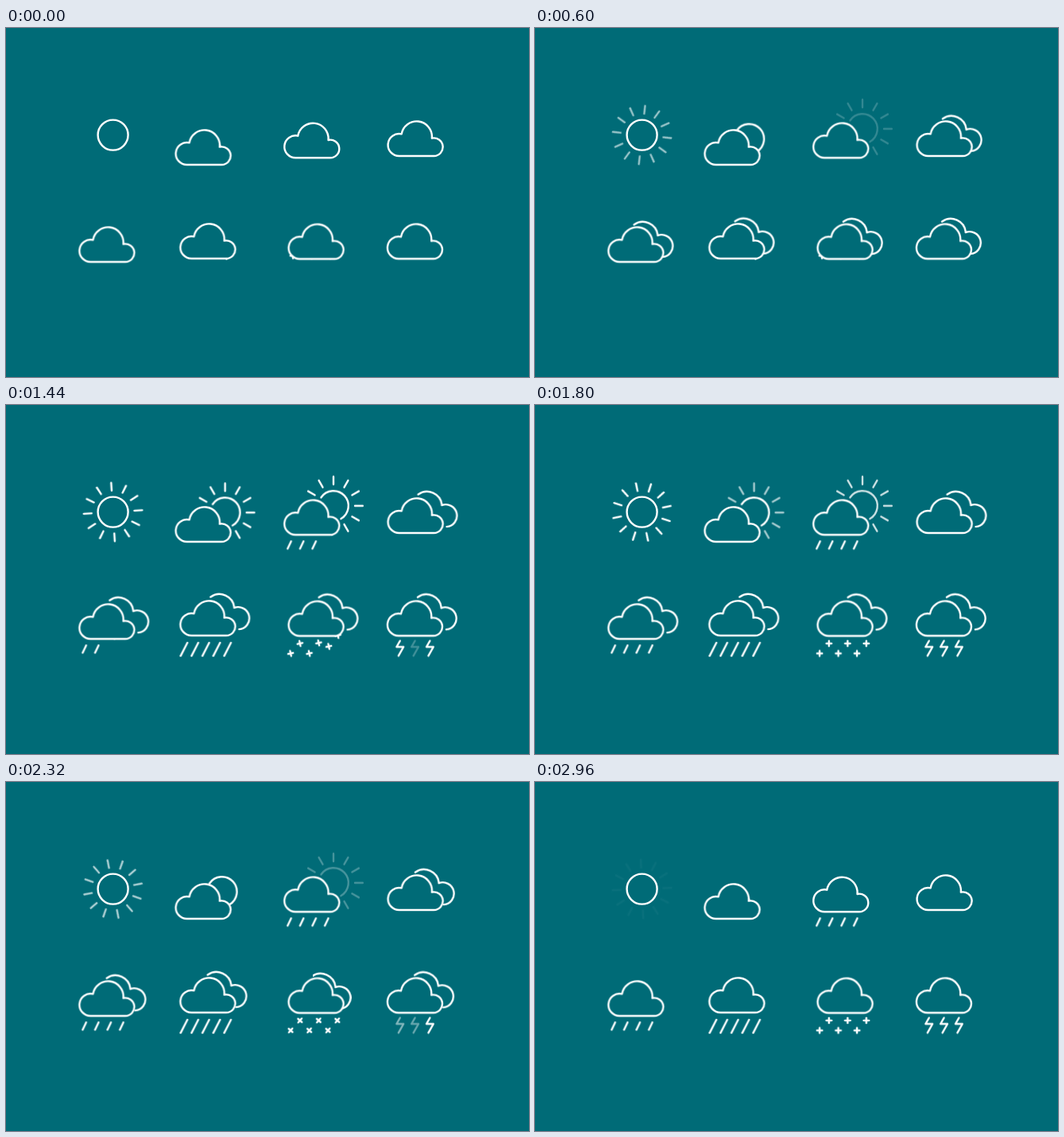
An HTML page for the animation above (3 s loop, 658 by 439 pixels).

```html
<!DOCTYPE html>
<html lang="en">
<head>
<meta charset="utf-8">
<title>Weather icons</title>
<style>
  html, body { margin: 0; width: 100%; height: 100%; overflow: hidden; background: #006b77; }
  svg { display: block; width: 658px; height: 439px; }
  g, path { fill: none; stroke: #fff; stroke-width: 2.4; stroke-linecap: round; stroke-linejoin: round; }
  .front { fill: #006b77; }
  .spin { animation: spin 3s linear infinite; }
  .fade { animation: fade 3s linear infinite; }
  @keyframes spin { to { transform: rotate(180deg); } }
  @keyframes fade {
    0%, 100% { opacity: 0; }
    33.333%, 66.667% { opacity: 1; }
  }
</style>
</head>
<body>
<svg id="stage" viewBox="0 0 658 439">
  <clipPath id="behind"><rect x="30.5" y="-70" width="80" height="90"/></clipPath>
</svg>
<script>
const LOOP = 3000;
const IN_OUT = 'cubic-bezier(.65,0,.35,1)';
const SINE = 'cubic-bezier(.37,0,.63,1)';
const OUT = 'cubic-bezier(.33,.67,.67,1)';

function add(parent, tag, attrs = {}) {
  const el = document.createElementNS('http://www.w3.org/2000/svg', tag);
  for (const key in attrs) el.setAttribute(key, attrs[key]);
  return parent.appendChild(el);
}

const group = (parent, x = 0, y = 0) => add(parent, 'g', { transform: `translate(${x} ${y})` });
const draw = (parent, d) => add(parent, 'path', { d });

// Each frame is [time in ms, value, easing to the next frame].
function animate(el, prop, frames) {
  const keys = frames.map(([ms, value, easing = 'linear']) => ({ offset: ms / LOOP, [prop]: value, easing }));
  keys.unshift({ ...keys[0], offset: 0, easing: 'linear' });
  keys.push({ ...keys[keys.length - 1], offset: 1 });
  el.animate(keys, { duration: LOOP, iterations: Infinity });
}

const move = (x, y) => `translate(${x}px, ${y}px)`;

function polar(cx, cy, r, deg) {
  const a = deg * Math.PI / 180;
  return `${(cx + r * Math.cos(a)).toFixed(2)} ${(cy + r * Math.sin(a)).toFixed(2)}`;
}

// Chain of clockwise arcs, each [cx, cy, r, from, to] in degrees.
function arcs(...list) {
  return list.map(([cx, cy, r, from, to], i) =>
    `${i ? 'L' : 'M'}${polar(cx, cy, r, from)} A${r} ${r} 0 ${to - from > 180 ? 1 : 0} 1 ${polar(cx, cy, r, to)}`
  ).join(' ');
}

function rays(parent, first, count) {
  let d = '';
  for (let i = 0; i < count; i++) {
    const a = first + i * 30;
    d += `M${polar(0, 0, 27, a)} L${polar(0, 0, 36.8, a)} `;
  }
  return draw(parent, d);
}

const CLOUD = arcs([14, -14, 14, 90, 282], [36, -24.3, 19.3, 190, 364], [57.7, -11.3, 11.3, 257.5, 450]) + 'Z';
const BACK_CLOUD = arcs([49, -33, 19, 234.6, 354], [72.7, -21.8, 14, 249, 445]);
const SUN_ARC = arcs([0, 0, 18.8, 214, 420]);
const FLAKE = 'M-3.2 0H3.2M0 -3.2V3.2';

function fall(el, start, length, dx, dy, easing = IN_OUT) {
  animate(el, 'transform', [[start, move(dx, dy), easing], [start + length, move(0, 0)]]);
}

// Origin is the lower left corner of the front cloud.
function cloud(x, y, fill) {
  const icon = group(stage, x, y);
  fill(icon);
  add(icon, 'path', { d: CLOUD, class: 'front' });
}

function backCloud(icon, leave = 2000) {
  const clip = add(icon, 'g', { 'clip-path': 'url(#behind)' });
  const back = draw(clip, BACK_CLOUD);
  const hidden = move(-28, 8);
  animate(back, 'transform', [
    [0, hidden, IN_OUT], [960, move(0, 0)], [leave, move(0, 0), IN_OUT], [leave + 1000, hidden]
  ]);
  animate(back, 'visibility', [
    [0, 'hidden', 'step-end'], [120, 'visible', 'step-end'], [leave + 900, 'hidden', 'step-end']
  ]);
}

function lightRain(icon, start) {
  for (let i = 0; i < 4; i++) {
    const x = 15.6 * i;
    fall(draw(icon, `M${x + 8.4} 8.2L${x + 4} 17.4`), start + 200 * i, 300, 12, -24);
  }
}

function heavyRain(icon) {
  for (let i = 0; i < 5; i++) {
    const x = 13.7 * i;
    fall(draw(icon, `M${x + 8.8} 9L${x + 0.3} 25.6`), 740 + 130 * i, 180, i < 4 ? 12.5 : 3, i < 4 ? -26 : -25);
  }
}

function snow(icon) {
  // Columns and rows in the order of falling.
  const order = [[0, 1], [2, 1], [1, 0], [3, 0], [4, 1], [5, 0]];
  order.forEach(([col, row], i) => {
    const spot = group(icon, 2.5 + 11.75 * col, row ? 22 : 9.5);
    const flake = add(spot, 'g');
    fall(flake, 800 + 100 * i, 400, row ? 3 : 1, row ? -26 : -14, SINE);
    animate(draw(flake, FLAKE), 'transform', [
      [1000, 'rotate(-90deg)', OUT], [1700, 'rotate(0deg)'],
      [1800, 'rotate(0deg)', SINE], [2900, 'rotate(90deg)']
    ]);
  });
}

function lightning(icon) {
  const dips = [
    [[1060, .7], [2320, .5]],
    [[1440, .25], [2320, .4]],
    [[2720, .4]]
  ];
  dips.forEach((list, i) => {
    const x = 18.8 * i;
    const bolt = draw(icon, `M${x + 15.8} 6.4L${x + 11.4} 14H${x + 20.2}L${x + 13.9} 25.2`);
    fall(bolt, [720, 930, 1100][i], 300, 11 - 3 * i, -28);
    animate(bolt, 'opacity', list.flatMap(([ms, low]) => [[ms - 120, 1], [ms, low], [ms + 120, 1]]));
  });
}

const stage = document.getElementById('stage');

// Clear sky
const sun = group(stage, 134.6, 134.6);
add(sun, 'circle', { r: 19 });
const spin = add(sun, 'g', { class: 'spin' });
rays(spin, 0, 12).classList.add('fade');

// Sun behind a cloud
cloud(213.6, 172, icon => {
  const spot = group(icon, 62, -36.7);
  const disc = draw(spot, SUN_ARC);
  const hidden = move(-25, 17);
  animate(disc, 'transform', [
    [0, hidden, IN_OUT], [1000, move(0, 0)], [1980, move(0, 0), IN_OUT], [2980, hidden]
  ]);
  animate(rays(spot, -150, 8), 'opacity', [[800, 0], [1400, 1], [1600, 1], [2200, 0]]);
});

// Sun with showers
cloud(350.3, 163.3, icon => {
  const spot = group(icon, 61.7, -36.5);
  draw(spot, SUN_ARC);
  rays(spot, -150, 8);
  animate(spot, 'opacity', [[400, 0], [1400, 1], [1600, 1], [2600, 0]]);
  lightRain(icon, 720);
});

// Overcast, rain, downpour, snow, storm
cloud(480.6, 161, icon => backCloud(icon));
cloud(92.4, 294.2, icon => { backCloud(icon); lightRain(icon, 920); });
cloud(219.4, 290, icon => { backCloud(icon); heavyRain(icon); });
cloud(355.6, 290.5, icon => { backCloud(icon, 1890); snow(icon); });
cloud(479.9, 290.3, icon => { backCloud(icon); lightning(icon); });
</script>
</body>
</html>
```
